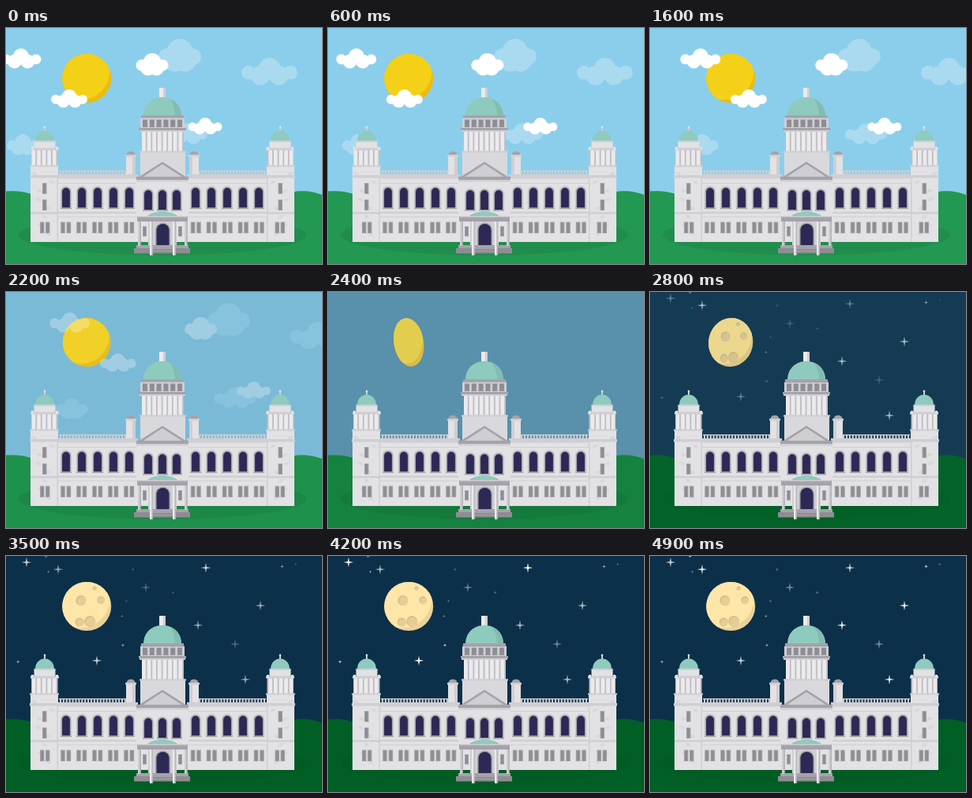
Recreate the animation shown at these times as an HTML page. Size 400 by 300 pixels, loop 5 s.

```html
<!DOCTYPE html>
<html lang="en">
<head>
<meta charset="utf-8">
<title>City hall, day to night</title>
<style>
html, body { margin: 0; width: 100%; height: 100%; overflow: hidden; }
svg { display: block; width: 100vw; height: 100vh; }
</style>
</head>
<body>
<svg id="stage" viewBox="0 0 400 300" preserveAspectRatio="none"></svg>
<script>
const LOOP = 5000;
const DRIFT = 28 / 1000; // px per ms
const WALL = '#e2e1e4', PALE = '#ebeaec', TRIM = '#cfced3', GREY = '#a5a3a9', DARK = '#8f8d94';
const NAVY = '#2d2955', GREEN = '#8fcabf', GREEN_DARK = '#82bdb1';
const DAY = { sky: [139, 206, 235], grass: [34, 152, 82], orb: [245, 208, 24], rim: [237, 187, 14] };
const NIGHT = { sky: [12, 48, 73], grass: [1, 95, 37], orb: [253, 230, 168], rim: [235, 210, 153] };

const rect = (x, y, w, h, fill) => `<rect x="${x}" y="${y}" width="${w}" height="${h}" fill="${fill}"/>`;
const path = (d, fill) => `<path d="${d}" fill="${fill}"/>`;
const disc = (x, y, r, fill) => `<circle cx="${x}" cy="${y}" r="${r}" fill="${fill}"/>`;
const repeat = (n, draw) => Array.from({ length: n }, (_, i) => draw(i)).join('');

function seeded(seed) {
  return () => (seed = (seed * 16807) % 2147483647) / 2147483647;
}

// Five puffs: largest in the middle, alternating high and low
function cloud(x, y, w, h, fill) {
  return repeat(5, i => {
    const u = i / 4, swell = Math.sin(Math.PI * u);
    const r = h * (0.26 + 0.14 * swell);
    const cy = h * (0.55 - 0.15 * swell * Math.cos(Math.PI * i));
    return disc(x + r + u * (w - 2 * r), y + cy, r, fill);
  });
}
const farClouds = [[193, 14, 54, 41], [298, 38, 71, 34], [1, 135, 41, 26], [202, 121, 53, 26]];
const nearClouds = [[-6.5, 26, 51, 25], [57, 78, 46, 23], [164.5, 32, 41, 28], [230.5, 114, 43, 21]];
const drawClouds = (list, fill) => list.map(box => cloud(...box, fill)).join('');

function star(x, y, s) {
  const k = s * 0.16;
  return path(`M${x} ${y - s}L${x + k} ${y - k}L${x + s} ${y}L${x + k} ${y + k}L${x} ${y + s}` +
    `L${x - k} ${y + k}L${x - s} ${y}L${x - k} ${y - k}z`, '#fff');
}
// Each group twinkles together around a mean, brightest at its peak time
const twinkles = [
  { mean: 0.7, swing: 0.3, peak: 4200, points: [[26, 8], [253, 15], [115, 133]] },
  { mean: 0.75, swing: 0.2, peak: 5300, points: [[66, 17], [322, 63], [243, 88], [303, 157]] },
  { mean: 0.34, swing: 0.1, peak: 4700, points: [[177, 40], [290, 112]] }
];
const random = seeded(29);
const starGroup = ({ points }) => '<g class="twinkle">' + points.map(([x, y]) => star(x, y, 6.3)).join('') +
  repeat(4, () => star(15 + 365 * random(), 165 * random(), 1.8 + random())) + '</g>';

const craters = [[-7.5, -7.5, 6.5], [4, 19, 7], [-9, 20, 5.5], [18, -8, 4.8], [10, -23, 2.6]]
  .map(([x, y, r]) => disc(x, y, r, '#d9c08a') + disc(x + 0.8, y + 0.8, r - 1, '#e5cd95')).join('');

function archWindow(cx, top, bottom) {
  const arch = (w, y, fill) =>
    path(`M${cx - w / 2} ${bottom}V${y + w / 2}a${w / 2} ${w / 2} 0 0 1 ${w} 0V${bottom}z`, fill);
  return arch(14.4, top - 1.5, TRIM) + arch(12.4, top, GREY) + arch(9.8, top + 1.3, NAVY) +
    rect(cx - 7, bottom, 14, 1.6, GREY);
}
const pane = (x, y, w, h) => rect(x, y, w, h, GREY) + rect(x + 1, y + 1, w - 2, h - 2, DARK);
const columns = (n, x, y, w, h) =>
  rect(x, y, w, h, '#bfbdc3') + repeat(n, i => rect(x + i * w / n, y, w / n * 0.72, h, PALE));

function bricks(n, x, y, w, h, rnd) {
  return repeat(n, i => {
    const bx = x + (w - 8) * rnd(), by = y + h * (i + 0.5) / n;
    return rect(bx, by, 6, 1, TRIM) + rect(bx + 2, by + 2, 5, 1, TRIM);
  });
}

function tower() {
  return rect(48, 125, 2, 6, TRIM) + disc(49, 126, 1.3, WALL) +
    path('M37 144C37 126 61 126 61 144z', GREEN) +
    rect(35.5, 143.5, 27, 10, WALL) + rect(35.5, 143.5, 27, 1.5, TRIM) +
    columns(5, 32.5, 154, 33, 21) +
    rect(31, 152.5, 36, 3, TRIM) + rect(32, 151, 3, 4, WALL) + rect(63, 151, 3, 4, WALL) +
    rect(31, 175, 35, 97, WALL) + rect(30, 174.5, 37, 2, TRIM) + rect(30, 187, 37, 3.5, TRIM) +
    rect(64.5, 190, 1.5, 82, TRIM) + rect(31, 234, 35, 2.5, TRIM) +
    bricks(8, 32, 178, 32, 88, seeded(7)) +
    [197, 218].map(y => pane(46, y, 5.5, 14)).join('') +
    [43, 50].map(x => pane(x, 246.5, 5.5, 14.5)).join('');
}

function wing() {
  return rect(152, 162, 12, 24, WALL) + rect(160, 164, 4, 22, TRIM) +
    path('M152.5 162C152 155 164 155 163.5 162z', GREY) + rect(151, 161, 14, 2.5, TRIM) +
    rect(67, 181, 86, 1.3, TRIM) + repeat(22, i => rect(68 + i * 3.9, 181, 2, 6, TRIM)) +
    rect(66, 190, 101, 82, WALL) + rect(66, 186, 101, 5.5, TRIM) + rect(66, 197, 101, 1, TRIM) +
    rect(66, 233.5, 101, 2.5, TRIM) + rect(66, 239.5, 101, 1, TRIM) +
    repeat(5, i => {
      const x = 76 + 20 * i;
      return archWindow(x, 202, 228.5) + pane(x - 6.8, 246.5, 5.6, 14.5) + pane(x + 0.6, 246.5, 5.6, 14.5);
    });
}

function drum() {
  return rect(194, 76, 8, 14, PALE) + rect(199, 76, 3, 14, TRIM) +
    path('M174 112C174 80 222 80 222 112z', GREEN) +
    path('M207 90C218 94 222 103 222 112H214C214 104 212 95 207 90z', GREEN_DARK) +
    rect(171, 111, 54, 3.5, GREY) + rect(170, 114.5, 56, 13, TRIM) +
    repeat(6, i => rect(173 + i * 8.8, 116.5, 6, 9.5, DARK)) +
    rect(168, 127, 60, 3, GREY) + rect(169, 130, 58, 2, TRIM) +
    columns(8, 172, 132, 53, 25) +
    rect(170, 156.5, 57, 34, '#d9d8dc') + rect(169, 156.5, 59, 2, TRIM);
}

function porch() {
  const column = (x, end, fill) => rect(x, 246, 3.6, end - 246, fill) + rect(x + 2.5, 246, 1.1, end - 246, GREY);
  return path('M178 240C185 231 211 231 218 240z', GREEN) +
    rect(180, 246, 36, 30, TRIM) +
    path('M189 277V257a9.5 9.5 0 0 1 19 0V277z', GREY) + path('M190.5 277V257a8 8 0 0 1 16 0V277z', NAVY) +
    rect(165, 276, 66, 5, GREY) + rect(162, 280, 71, 6.5, DARK) +
    repeat(3, i => rect(184, 277 + i * 3, 28, 1, GREY)) +
    [167, 226].map(x => column(x, 277, TRIM)).join('') +
    [182, 211].map(x => column(x, 289, PALE)).join('') +
    rect(166, 239.5, 64, 6.5, GREY) + rect(167, 239, 62, 1.5, TRIM);
}

function centre() {
  return drum() + rect(165, 190, 66, 82, WALL) +
    path('M167 190L198 170L229 190z', GREY) + path('M173 189.5L198 173L223 189.5z', TRIM) +
    rect(165, 189, 66, 4, GREY) + rect(165, 193, 66, 2.5, TRIM) +
    repeat(3, i => archWindow(180 + 18 * i, 205, 231)) +
    [173, 218].map(x => pane(x, 252, 5, 13)).join('') + porch();
}

const stage = document.getElementById('stage');
stage.innerHTML =
  `<defs><clipPath id="edge"><circle r="31"/></clipPath></defs>
  <rect id="sky" width="400" height="300"/>
  <g id="stars">${twinkles.map(starGroup).join('')}</g>
  <g id="orb">
    <circle id="rim" r="31"/>
    <g clip-path="url(#edge)"><circle id="face" cx="-8" cy="-10" r="37.5"/><g id="craters">${craters}</g></g>
  </g>
  <g id="clouds">${drawClouds(farClouds, '#aadaf0')}${drawClouds(nearClouds, '#fff')}</g>
  <path id="grass" d="M0 207.5Q18 206 34 211.5L70 230H330L362 208.5Q382 205 400 212V300H0z"/>
  <ellipse id="shade" cx="198" cy="263" rx="182" ry="26" fill="#000"/>
  <g id="half">${wing()}${tower()}</g>
  <use href="#half" transform="translate(396) scale(-1 1)"/>
  ${centre()}`;

const el = id => document.getElementById(id);
const twinkleNodes = [...document.querySelectorAll('.twinkle')];
const set = (id, name, value) => el(id).setAttribute(name, value);
const span = (t, from, to) => Math.min(1, Math.max(0, (t - from) / (to - from)));
const ease = p => (1 - Math.cos(Math.PI * p)) / 2;
const blend = (key, p) => `rgb(${DAY[key].map((v, i) => Math.round(v + (NIGHT[key][i] - v) * p))})`;

// The sun turns like a coin and shows the moon on its back
function turnOrb(turn) {
  const width = Math.cos(Math.PI * turn);
  const tilt = width > 0 ? -9 : 9;
  set('orb', 'transform', `translate(102.2 64) rotate(${tilt}) scale(${Math.abs(width)} 1) rotate(${-tilt})`);
  set('orb', 'opacity', 1 - 0.16 * Math.sin(Math.PI * turn));
  set('face', 'fill', blend('orb', turn));
  set('rim', 'fill', blend('rim', turn));
  set('craters', 'opacity', width > 0 ? 0 : 1);
}

function render(t) {
  const dusk = ease(span(t, 1970, 2970));
  set('sky', 'fill', blend('sky', dusk));
  set('grass', 'fill', blend('grass', dusk));
  set('shade', 'opacity', 0.07 - 0.04 * dusk);
  turnOrb(ease(span(t, 2030, 3050)));
  set('clouds', 'transform', `translate(${t * DRIFT} 0)`);
  set('clouds', 'opacity', 1 - span(t, 1950, 2300));
  set('stars', 'opacity', span(t, 2450, 2900));
  twinkles.forEach(({ mean, swing, peak }, i) =>
    twinkleNodes[i].setAttribute('opacity', mean + swing * Math.cos(2 * Math.PI * (t - peak) / 3200)));
}

const start = performance.now();
function tick() {
  render((performance.now() - start) % LOOP);
  requestAnimationFrame(tick);
}
tick();
</script>
</body>
</html>
```
